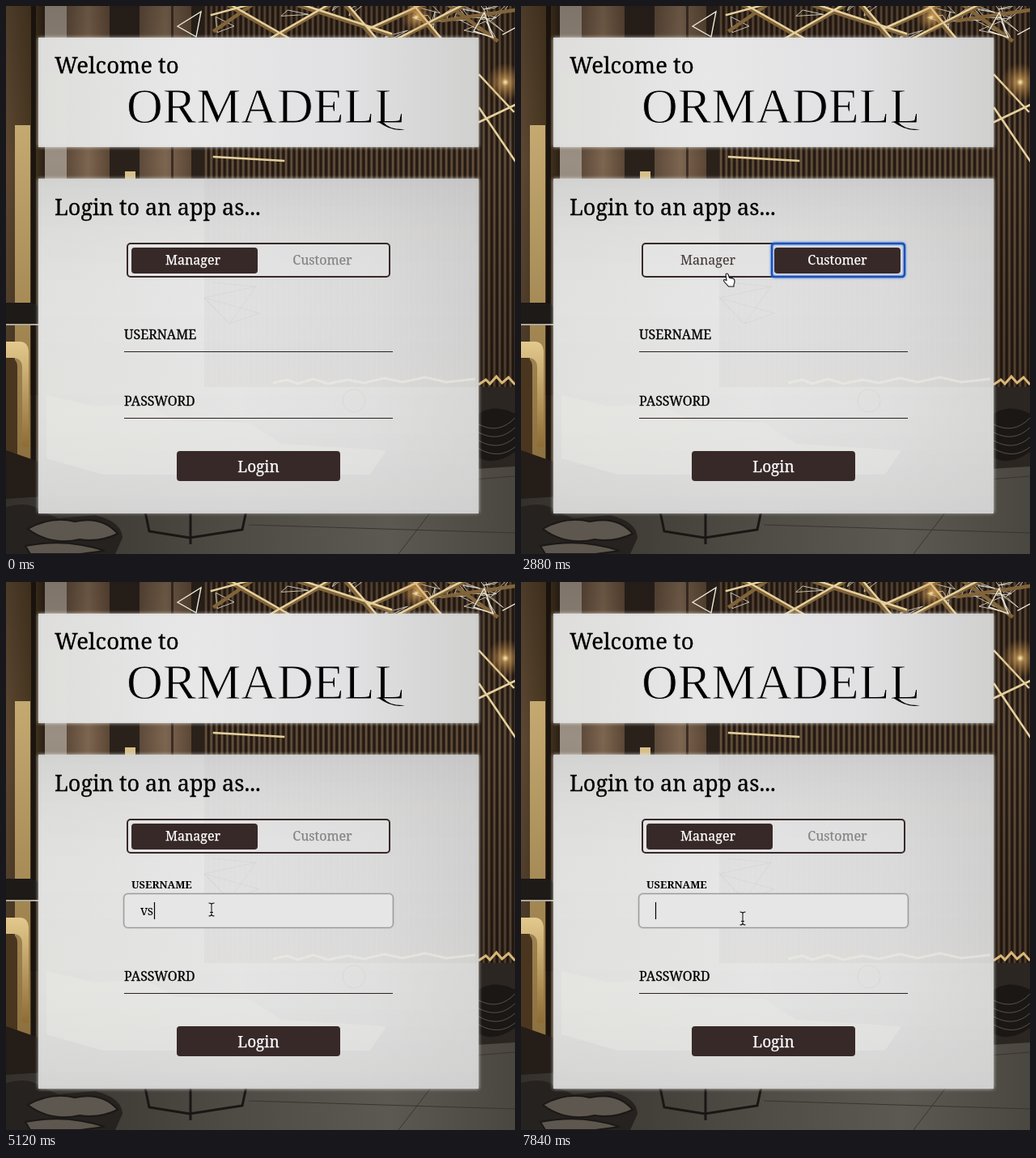
Write an HTML page that moves like this. It is 629 px wide and 676 px high and loops after 8 s.

```html
<!DOCTYPE html>
<html lang="en">
<head>
<meta charset="utf-8">
<title>Login</title>
<style>
html, body { margin: 0; width: 100%; height: 100%; overflow: hidden; background: #2a221c; }
svg { display: block; width: 629px; height: 676px; font-family: "Noto Serif", serif; }
text { fill: #000; font-size: 16px; }
.medium { font-weight: 500; stroke: #000; stroke-width: .3px; }
.brand { font: 62px "Liberation Serif", serif; stroke: #e3e3e4; stroke-width: 1px; }
.small { font-size: 12.8px; font-weight: 700; }
.mid { text-anchor: middle; }
.on { fill: #fff; stroke: #fff; stroke-width: .25px; }
.off { fill: #858383; stroke: #858383; stroke-width: .25px; }
.dark { fill: #382929; }
.line { stroke: #2c2222; stroke-width: 1; }
.box { fill: #e6e6e6; stroke: #9a9a9a; stroke-width: 1.3; }
.halo { fill: none; stroke: #777; stroke-width: 3.5; stroke-opacity: .16; }
.ring { fill: none; stroke: #1d52b0; stroke-width: 2.4; filter: drop-shadow(0 0 1.5px #2f78ff); }
.panel { filter: drop-shadow(0 0 2px #e4e4e0); }
.caret { stroke: #000; stroke-width: 1.2; }

/* One percent is 80 ms */
.anim { animation: 8s step-end infinite; }
#manager { animation-name: manager; }
#customer { animation-name: customer; }
#managerRing { animation-name: managerRing; }
#customerOff { animation-name: customerHover; }
#managerOff { animation-name: managerHover; }
.lift { animation-name: lift; }
#userIdle { animation-name: userIdle; }
#userFocus { animation-name: userFocus; }
#userDone { animation-name: userDone; }
#passIdle { animation-name: passIdle; }
#passFocus { animation-name: passFocus; }
#typedV { animation-name: typedV; }
#typedS { animation-name: typedS; }
#userCaret { animation-name: userCaret; }
#passCaret { animation-name: passCaret; }
#pointer { animation: path 8s step-end infinite; }
#press { animation-name: press; }
#arrow { animation-name: arrow; }
#hand { animation-name: hand; }
#beam { animation-name: beam; }

@keyframes manager { 0%, 40% { opacity: 1 } 28% { opacity: 0 } }
@keyframes customer { 0%, 40% { opacity: 0 } 28% { opacity: 1 } }
@keyframes managerRing { 0%, 46% { opacity: 0 } 40% { opacity: 1 } }
@keyframes customerHover { 0%, 28% { fill: #858383 } 22% { fill: #382929 } }
@keyframes managerHover { 0% { fill: #858383 } 36% { fill: #382929 } }
@keyframes lift { 0% { transform: none } 46%, 100% { transform: translateY(-1px) } }
@keyframes userIdle { 0% { opacity: 1 } 46%, 100% { opacity: 0 } }
@keyframes userFocus { 0%, 70% { opacity: 0 } 46%, 86%, 100% { opacity: 1 } }
@keyframes userDone { 0%, 86% { opacity: 0 } 70% { opacity: 1 } }
@keyframes passIdle { 0%, 86%, 100% { opacity: 1 } 70% { opacity: 0 } }
@keyframes passFocus { 0%, 86% { opacity: 0 } 70% { opacity: 1 } }
@keyframes typedV { 0%, 98%, 100% { opacity: 0 } 56% { opacity: 1 } }
@keyframes typedS { 0%, 96%, 100% { opacity: 0 } 58% { opacity: 1 } }
@keyframes userCaret {
  0% { opacity: 0; transform: none }
  50% { opacity: 1; transform: none }
  56% { opacity: 1; transform: translateX(9px) }
  58%, 94% { opacity: 1; transform: translateX(17px) }
  92% { opacity: 0; transform: translateX(17px) }
  96% { opacity: 1; transform: translateX(9px) }
  98%, 100% { opacity: 1; transform: none }
}
@keyframes passCaret { 0%, 82% { opacity: 1 } 76% { opacity: 0 } }
@keyframes path {
  0% { opacity: 0; transform: translate(492px, 547px) }
  2% { opacity: 1; transform: translate(492px, 547px); animation-timing-function: steps(5, end) }
  12% { transform: translate(289.5px, 327.5px) }
  20% { transform: translate(362px, 321px) }
  22% { transform: translate(420px, 315.5px) }
  32% { transform: translate(382px, 324px) }
  34% { transform: translate(308px, 334px) }
  36% { transform: translate(257px, 338px) }
  38% { transform: translate(251px, 322px) }
  42% { transform: translate(252px, 357px) }
  44%, 58% { transform: translate(254px, 404px) }
  58% { animation-timing-function: steps(5, end) }
  68%, 74% { transform: translate(259px, 486px) }
  74% { animation-timing-function: steps(5, end) }
  84% { transform: translate(274px, 417px) }
  86%, 100% { opacity: 1; transform: translate(274px, 415px) }
}
@keyframes press {
  0%, 16%, 28%, 40%, 48%, 72%, 88%, 100% { opacity: 0 }
  14%, 26%, 38%, 46%, 70%, 86% { opacity: 1 }
}
@keyframes arrow { 0%, 40% { opacity: 1 } 22%, 44%, 100% { opacity: 0 } }
@keyframes hand { 0%, 40%, 100% { opacity: 0 } 22% { opacity: 1 } }
@keyframes beam { 0% { opacity: 0 } 44%, 100% { opacity: 1 } }
</style>
</head>
<body>
<svg viewBox="0 0 629 676">
  <defs>
    <pattern id="ribs" width="6.6" height="676" patternUnits="userSpaceOnUse">
      <rect width="6.6" height="676" fill="#241a14"/>
      <rect x="1.5" width="2.8" height="676" fill="#65503b"/>
    </pattern>
    <linearGradient id="wood">
      <stop offset="0" stop-color="#5e4a3a"/><stop offset=".5" stop-color="#7d6650"/><stop offset="1" stop-color="#5c4736"/>
    </linearGradient>
    <linearGradient id="plank">
      <stop offset="0" stop-color="#5d4833"/><stop offset=".7" stop-color="#47361f"/><stop offset="1" stop-color="#2b2016"/>
    </linearGradient>
    <linearGradient id="gold" x2="0" y2="1">
      <stop offset="0" stop-color="#c4a971"/><stop offset=".5" stop-color="#a98d58"/><stop offset="1" stop-color="#8c7040"/>
    </linearGradient>
    <linearGradient id="brass" x2="0" y2="1">
      <stop offset="0" stop-color="#e3c98d"/><stop offset="1" stop-color="#8e6c35"/>
    </linearGradient>
    <linearGradient id="shade" x2="0" y2="1">
      <stop offset="0" stop-color="#0e0906" stop-opacity=".2"/><stop offset=".4" stop-color="#0e0906" stop-opacity="0"/><stop offset="1" stop-color="#0e0906" stop-opacity=".25"/>
    </linearGradient>
    <linearGradient id="floor" x2="1">
      <stop offset="0" stop-color="#34312c"/><stop offset=".4" stop-color="#4c4943"/><stop offset=".75" stop-color="#5c5952"/><stop offset="1" stop-color="#4a4741"/>
    </linearGradient>
    <radialGradient id="glow">
      <stop offset="0" stop-color="#fff0bd"/><stop offset=".2" stop-color="#e8b465" stop-opacity=".6"/><stop offset="1" stop-color="#b77a35" stop-opacity="0"/>
    </radialGradient>
    <linearGradient id="glassTop">
      <stop offset="0" stop-color="#dededc"/><stop offset=".35" stop-color="#e9e9ea"/><stop offset=".7" stop-color="#e2e2e4"/><stop offset="1" stop-color="#d0d0cf"/>
    </linearGradient>
    <linearGradient id="glass">
      <stop offset="0" stop-color="#e0e0de"/><stop offset=".45" stop-color="#e8e8e9"/><stop offset=".75" stop-color="#e0e0e1"/><stop offset="1" stop-color="#d0d0d0"/>
    </linearGradient>
    <linearGradient id="haze" x2="0" y2="1">
      <stop offset="0" stop-color="#c4c4c4" stop-opacity=".5"/><stop offset=".35" stop-color="#e6e6e6" stop-opacity=".15"/><stop offset=".7" stop-color="#dededc" stop-opacity=".4"/><stop offset="1" stop-color="#cecece" stop-opacity=".75"/>
    </linearGradient>
  </defs>

  <g id="room">
    <rect width="629" height="676" fill="#2a211b"/>
    <rect width="48" height="620" fill="url(#plank)"/>
    <path d="M34 0V600" stroke="#1c140f" stroke-width="6"/>
    <rect x="48" width="27" height="600" fill="#9a8f83"/>
    <rect x="75" width="53" height="600" fill="url(#wood)"/>
    <rect x="165" width="64" height="600" fill="url(#wood)"/>
    <rect x="204" width="3" height="600" fill="#3b2d23"/>
    <rect x="147" y="204" width="13" height="370" fill="#d9c28c"/>
    <rect x="245" width="384" height="472" fill="url(#ribs)"/>
    <rect width="629" height="480" fill="url(#shade)"/>
    <rect x="11" y="147" width="19" height="414" fill="url(#gold)"/>
    <path d="M0 366h30q10 1 10 8v20H0z" fill="#1d1a18"/>
    <path d="M0 393h40" stroke="#b1a894" stroke-width="2"/>
    <path d="M0 433q14 0 14 12v160H0z" fill="#4a361f"/>
    <path d="M0 414h17q10 0 11 12v118h-8V446q0-12-12-12H0z" fill="url(#brass)"/>
    <path d="M0 548l40 14v62H0z" fill="#241d18"/>
    <rect x="245" y="470" width="384" height="106" fill="#2b2621"/>
    <path d="M584 467l9-6 5 5 8-9 7 8 8-7 8 9" fill="none" stroke="#d9b778" stroke-width="3"/>
    <path d="M584 503q20-13 45 0v47q-25 18-45 7z" fill="#1a1715"/>
    <path d="M584 516q25 13 45-8M584 526q25 13 45-6M584 536q25 14 45-4M584 546q25 14 45-2" fill="none" stroke="#57514a"/>
    <path d="M0 608L629 568V676H0z" fill="url(#floor)"/>
    <path d="M40 626L629 580M485 676L545 598M300 640L629 650" stroke="#383530" fill="none"/>
    <path d="M0 618q30-8 45 6l20 8 45-4q33 8 34 28l-9 20H0z" fill="#25221f"/>
    <path d="M27 645q28-16 58-9 34-7 53 15-23 11-47 7-36 8-64-13zM24 666q50-10 98 6l-30 4H30z" fill="#5d574f" stroke="#1b1815" stroke-width="2"/>
    <path d="M167 600l10 48 50 8 65-10 11-52M228 604v60" fill="none" stroke="#191614" stroke-width="3"/>
    <path id="wires" fill="none" stroke="#ece5d2" stroke-opacity=".8"/>
    <g fill="none" stroke-linecap="square">
      <path d="M258 30L302 0M276 0l75 43M326 42L399 0M363 0l113 36M420 0l36 42M448 30L525-5M481 43L566 0M501 0l35 42M540 18L629 5M548 0l58 42" stroke="#81643a" stroke-width="4.500"/>
      <path d="M254 11l48-13M277-2l75 43M326 40L399-2M365-2l111 36M422-2l36 42M448 28L525-7M482 41L566-2M503-2l35 42M585 143l44-21M585 126l44 65M585 85l42 45M257 186l86 5" stroke="#e6d19d" stroke-width="2.5"/>
      <path d="M212 25l29-18-6 31zM578 31l13-23 11 31zM614 35l15-8" stroke="#eee8d7" stroke-width="1.4"/>
    </g>
    <circle cx="617" cy="94" r="24" fill="url(#glow)"/>
    <circle cx="507" cy="14" r="19" fill="url(#glow)"/>
  </g>

  <rect class="panel" x="40" y="39" width="544" height="135" fill="url(#glassTop)" fill-opacity=".93"/>
  <text class="medium" x="60" y="83" style="font-size:27.6px">Welcome to</text>
  <text class="brand" x="149" y="144">ORMADELL</text>
  <path d="M466 143q8 10 27 9-15 4-33-9z"/>

  <g class="panel">
    <rect x="40" y="213" width="544" height="412" fill="url(#glass)" fill-opacity=".93"/>
    <rect x="40" y="213" width="544" height="412" fill="url(#haze)"/>
  </g>
  <rect class="anim lift" x="40" y="624" width="544" height="2" fill="#d0d0d0"/>
  <rect x="245" y="213" width="339" height="257" fill="url(#ribs)" opacity=".03"/>
  <path d="M50 480l60 14 60-4 40 22 90 2 40 26 130 8-20 30H120l-70-20z" fill="#ecebe7" fill-opacity=".4"/>
  <g fill="none" stroke="#cfcfcf" stroke-opacity=".5">
    <path d="M245 360l64-14-33 46zM245 360l31 32 37-13zM255 341l54 5"/>
    <circle cx="430" cy="487" r="14"/>
    <path d="M330 465l18-4 12 5 20-6 18 6 24-5 20 4 26-6 22 5 28-6 26 6 36-4" stroke="#f1efe8" stroke-width="3"/>
  </g>
  <text class="medium" x="60" y="258" style="font-size:27px">Login to an app as...</text>

  <rect x="150" y="293" width="324" height="41" rx="4" fill="#e8e8e8" fill-opacity=".4" stroke="#382929" stroke-width="2"/>
  <g id="manager" class="anim">
    <rect class="dark" x="155" y="298" width="156" height="32" rx="4"/>
    <text class="mid on" x="231" y="319">Manager</text>
    <text id="customerOff" class="anim mid off" x="391" y="319">Customer</text>
    <rect id="managerRing" class="anim ring" x="150" y="293" width="164" height="41" rx="3"/>
  </g>
  <g id="customer" class="anim">
    <rect class="dark" x="313" y="298" width="156" height="32" rx="4"/>
    <text id="managerOff" class="anim mid off" x="231" y="319">Manager</text>
    <text class="mid on" x="391" y="319">Customer</text>
    <rect class="ring" x="310" y="293" width="164" height="41" rx="3"/>
  </g>

  <g id="userIdle" class="anim">
    <text class="medium" x="146" y="411">USERNAME</text>
    <path class="line" d="M146 426.5H478"/>
  </g>
  <g id="userFocus" class="anim">
    <text class="small" x="155" y="378">USERNAME</text>
    <rect class="halo" x="145.7" y="384.7" width="332.6" height="41.6" rx="5"/>
    <rect class="box" x="145.7" y="384.7" width="332.6" height="41.6" rx="5"/>
    <text id="typedV" class="anim" x="166" y="411">v</text>
    <text id="typedS" class="anim" x="174.8" y="411">s</text>
    <path id="userCaret" class="anim caret" d="M166.5 395v21"/>
  </g>
  <g id="userDone" class="anim">
    <text class="small" x="155" y="379">USERNAME</text>
    <text x="156" y="412">vs</text>
    <path class="line" d="M146 426.5H478"/>
  </g>

  <g class="anim lift">
    <g id="passIdle" class="anim">
      <text class="medium" x="146" y="493">PASSWORD</text>
      <path class="line" d="M146 508.5H478"/>
    </g>
    <rect class="dark" x="211" y="549" width="202" height="37" rx="4"/>
    <text class="mid on" x="312" y="575" style="font-size:19px">Login</text>
  </g>
  <g id="passFocus" class="anim">
    <text class="small" x="155" y="460">PASSWORD</text>
    <rect class="halo" x="145.7" y="466.7" width="332.6" height="41.6" rx="5"/>
    <rect class="box" x="145.7" y="466.7" width="332.6" height="41.6" rx="5"/>
    <path id="passCaret" class="anim caret" d="M166.5 477v21"/>
  </g>

  <g id="pointer">
    <g id="press" class="anim">
      <circle r="16.5" fill="none" stroke="#fff" stroke-width="3"/>
      <circle r="16.3" fill="none" stroke="#222"/>
    </g>
    <path id="arrow" class="anim" d="M-4.5-8.5v14l3.2-2.9 2.2 5.3 2.4-1-2.2-5h4.4z" stroke="#fff" stroke-width="1.1"/>
    <path id="hand" class="anim" d="M-4-7q1.5-2 3 0l1.5 4.5q1.5-1 2.3.4 1.5-.8 2.2.6 1.5-.2 1.8 1.6.7 3-.8 5.4V8H-.5L-5.500 2.500q-2-2.500 0-3l2.500 1z" fill="#fff" stroke="#111" stroke-width="1.1"/>
    <g id="beam" class="anim" fill="none">
      <path d="M0-6V6" stroke="#fff" stroke-width="3" stroke-opacity=".4"/>
      <path d="M-3.500-8Q0-8 0-6V6Q0 8-3.500 8M3.500-8Q0-8 0-6M3.500 8Q0 8 0 6M-2 3.500H2" stroke="#111" stroke-width="1.1"/>
    </g>
  </g>
</svg>
<script>
// Fine hanging wire triangles, spread by a seeded generator
let seed = 7;
const rand = (min, max) => {
  seed = (seed * 16807) % 2147483647;
  return min + (max - min) * seed / 2147483647;
};
const corner = (x, y) => `${(x + rand(-26, 26)).toFixed(1)} ${(y + rand(-18, 18)).toFixed(1)}`;
let wires = "";
for (let i = 0; i < 20; i++) {
  const x = rand(270, 620), y = rand(-4, 26);
  wires += `M${corner(x, y)}L${corner(x, y)}L${corner(x, y)}Z`;
}
document.getElementById("wires").setAttribute("d", wires);
</script>
</body>
</html>
```
